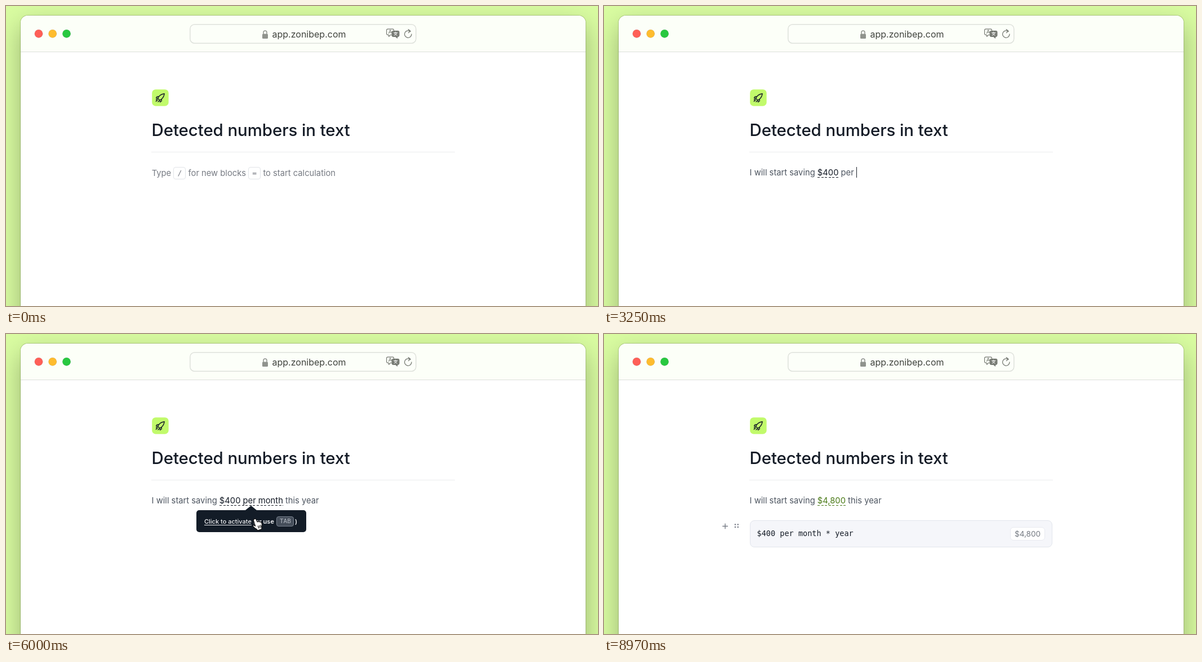
An HTML page that plays this animation: 1051x533 px, repeating every 9.44 s.

```html
<!DOCTYPE html>
<html lang="en">
<head>
<meta charset="utf-8">
<title>Numbers in text</title>
<style>
  html, body { margin: 0; width: 100%; height: 100%; overflow: hidden; background: #d9fca1; }
  body { position: relative; font: 14.74px/20px Inter, sans-serif; color: #4d5560; }
  body > * { position: absolute; white-space: pre; box-sizing: border-box; }
  [hidden] { display: none !important; }
  .window { left: 26px; top: 17px; width: 1003px; height: 560px; border-radius: 13px; background: #fff;
    box-shadow: 0 0 0 1px rgba(60,80,30,.25), 0 18px 46px rgba(0,0,0,.29); overflow: hidden; }
  .bar { height: 65px; background: #fcfff8; border-bottom: 1px solid #dcdfda; box-sizing: border-box; }
  .url { left: 472.5px; top: 40.2px; font-size: 16px; color: #40433e; }
  svg { left: 0; top: 0; }
  h1 { margin: 0; left: 258.6px; top: 199.8px; font-size: 29.44px; line-height: 40px; font-weight: 500; letter-spacing: -.08px; color: #141b26; }
  hr { margin: 0; left: 258px; top: 259px; width: 539px; height: 1.3px; border: 0; background: #ebecee; }
  #hint { left: 258.7px; top: 285.5px; display: flex; align-items: center; gap: 4.2px; color: #777b83; }
  #hint kbd { box-sizing: border-box; width: 22px; height: 22px; border: 1px solid #e1e4e8; border-radius: 4px;
    font: 13px/20px "DejaVu Sans Mono", monospace; text-align: center; }
  #line { left: 258.6px; top: 285.6px; }
  .num { color: #141b26; padding-bottom: 1px;
    background: repeating-linear-gradient(90deg, currentColor 0 4px, transparent 4px 6.6px) 0 100% / 100% 1.4px no-repeat; }
  .num.live { color: #4a7a17; }
  .caret { display: inline-block; width: 1.4px; height: 19px; margin-right: -1.4px; vertical-align: -4.4px; background: #1c222b; }
  #tip { top: 313px; width: 195px; height: 39px; margin-left: -97.5px; border-radius: 5px; background: #131c27; color: #f4f5f7;
    display: flex; align-items: center; padding-left: 14.5px; font-size: 11px; font-weight: 600; }
  #tip::before { content: ""; position: absolute; left: 87.5px; top: -8px; border: solid transparent; border-width: 0 10px 8px; border-bottom-color: #131c27; }
  #tip u { font-weight: 500; text-underline-offset: 2px; }
  #tip kbd { box-sizing: border-box; width: 31px; height: 18px; margin: 0 1.5px 0 4.5px; border: 1px solid #78818d; border-radius: 4px;
    background: #454e5a; color: #b4bac3; font: 11px/16px "DejaVu Sans Mono", monospace; text-align: center; }
  #block { left: 258.5px; top: 331.3px; width: 537.5px; height: 47.5px; border: 1px solid #e2e5ec; border-radius: 8px; background: #f5f6fa;
    font: 13.56px/45px "DejaVu Sans Mono", monospace; color: #161d27; }
  #formula { position: absolute; left: 12px; top: -.8px; }
  #result { position: absolute; right: 12px; top: 11px; box-sizing: border-box; height: 24px; padding: 0 7px; border: 1px solid #e8eaf0;
    border-radius: 6px; background: #fff; font: 13.55px/22px Inter, sans-serif; color: #757a82; }
  #result.fresh { background: #fffef0; }
</style>
</head>
<body>
<div class="window"><div class="bar"></div></div>
<h1>Detected numbers in text</h1>
<hr>
<div id="hint"><span>Type</span><kbd>/</kbd><span>for new blocks</span><kbd>=</kbd><span>to start calculation</span></div>
<div id="line"></div>
<div id="block"><span id="formula"></span><span id="result"></span></div>
<div id="tip"><u>Click to activate</u> (or use<kbd>TAB</kbd>)</div>

<svg width="1051" height="533" fill="none" stroke-linecap="round" stroke-linejoin="round">
  <rect x="326.8" y="32.700" width="401" height="33.500" rx="8" fill="#fcfff9" stroke="#dfe2dc" stroke-width="1.500"/>
  <g stroke="#000" stroke-opacity=".1" stroke-width=".8">
    <circle cx="58" cy="49.2" r="7.2" fill="#ff5f57"/>
    <circle cx="82.7" cy="49.2" r="7.2" fill="#febc2e"/>
    <circle cx="107.5" cy="49.2" r="7.2" fill="#28c840"/>
  </g>
  <rect x="455" y="49.5" width="10" height="8.5" rx="1.5" fill="#90938e"/>
  <path d="M457 50v-3a3 3 0 0 1 6 0v3" stroke="#90938e" stroke-width="1.5"/>
  <g stroke="#777b74" stroke-width="1.2" transform="translate(.6 -.2)">
    <path d="M684 51.5h-2l-3 3v-3h-1.5a2.5 2.5 0 0 1-2.5-2.5v-5.5a2.5 2.5 0 0 1 2.5-2.5h8a2.5 2.5 0 0 1 2.5 2.5"/>
    <path d="M678.8 49l2.7-6.5l2.5 6M679.700 47h3.500" stroke-width="1"/>
    <path d="M687 44.500h8a2.300 2.300 0 0 1 2.300 2.300v5.400a2.300 2.300 0 0 1-2.300 2.300h-1v2.700l-3-2.700h-4a2.300 2.300 0 0 1-2.300-2.300v-5.400a2.300 2.300 0 0 1 2.300-2.300z" fill="#777b74"/>
    <path d="M688 47.800h6.300M691 46.500v1.300M689 48q1 3 4.500 4.300M693.300 48q-1 3-4.700 4.300" stroke="#fff" stroke-width="1"/>
    <path d="M717.500 45.800a6.200 6.200 0 1 0 1.900 4.400M713.500 41.800l3.700 2.700l-3.200 3.200" stroke-width="1.300"/>
  </g>
  <rect x="259.2" y="148.200" width="29.440" height="29.440" rx="6.500" fill="#c1fa6b"/>
  <path d="M269.500 164q3-7 11.700-8.300q-1.200 8.700-8.200 11.800zM271.300 160.700l-3.300.3l-1.500 2.500l3 .5M276.300 165.700l-.2 3.300l-2.600 1.700l-.5-3.200M269.300 166.500l-3 3M267.800 165.500l-1.300 1.300M271.500 168.500l-1.500 1.700" stroke="#141b26" stroke-width="1.400"/>
  <g id="handles">
    <path d="M210.800 341.500h8.600M215.100 337.200v8.600" stroke="#777c86" stroke-width="1.400"/>
    <path d="M233 338.500h0M237.800 338.500h0M233 343h0M237.800 343h0" stroke="#777c86" stroke-width="2.700"/>
  </g>
  <g id="pointer" stroke="#111" stroke-width="1.200">
    <path id="arrow" d="M0 0v15l3.500-3.300l2.400 5.500l2.500-1.100l-2.400-5.400h4.800z" fill="#111" stroke="#fff"/>
    <path id="hand" d="M-4.800-8.300q1.700-1.200 2.800.7l2.300 4.500q1-1.400 2.600-.2q1.200-1 2.400.4q1.500-.6 2.200.8q2.200 4.700.2 8.500l.4 3.200l-7.500 2.500l-1.500-2.300q-3.500-1.600-6.600-5.200q-.5-2 1.600-1.800l2.500 1.500l-3.200-10q-.5-1.700 1.800-2.600zM1.500 4l1.300 4M4 3.200l1.200 4M6.300 2.500l1.200 3.700" fill="#fff"/>
  </g>
</svg>
<div class="url">app.zonibep.com</div>

<script>
const LOOP = 9440, STEP = 250, LAST_HOLD = 8500, LAST_CHANGE = 8970;
const LEAD = "I will start saving ", AMOUNT = "$400 per month", TAIL = " this year";
const SENTENCE = LEAD + AMOUNT + TAIL, FORMULA = AMOUNT + " * year";
const CARET = '<span class="caret"></span>';
const CLICK = 6250;

const typing = [[250, 0], [1500, 13], [2500, 23], [2750, 24], [3750, 35], [4250, 42], [4500, 44]];
const formulaTyping = [[6500, 14], [7500, 20], [7750, 21]];
const pointerX = [[5000, 478], [5250, 462], [5500, 443], [6000, 446]];
const pointerY = [[5000, 520], [5250, 410], [5500, 301], [6000, 337]];

const $ = id => document.getElementById(id);
const show = (id, on) => on ? $(id).removeAttribute("hidden") : $(id).setAttribute("hidden", "");
const within = (t, from, to) => t >= from && t < to;

function track(keys, t) {
  if (t <= keys[0][0]) return keys[0][1];
  for (let i = 1; i < keys.length; i++) {
    const [t0, a] = keys[i - 1], [t1, b] = keys[i];
    if (t <= t1) return a + (b - a) * (t - t0) / (t1 - t0);
  }
  return keys[keys.length - 1][1];
}

function value(t) {
  return t < 7500 ? AMOUNT : t < 8250 ? "$400 yes per month" : "$4,800";
}

function sentence(t) {
  if (t >= CLICK) return `${LEAD}<span class="num live">${value(t)}</span>${TAIL}`;
  const count = Math.floor(track(typing, t) + 1e-6);
  const text = SENTENCE.slice(0, count);
  const start = LEAD.length, end = start + (count < start + AMOUNT.length ? 4 : AMOUNT.length);
  const body = count < start + 2 ? text
    : `${LEAD}<span class="num">${text.slice(start, end)}</span>${text.slice(end)}`;
  return body + (within(t, 250, 5000) ? CARET : "");
}

function draw(t) {
  const active = t >= CLICK;
  show("hint", t < 500);
  $("line").innerHTML = sentence(t);

  show("tip", within(t, 2500, 3000) || within(t, 5500, CLICK));
  $("tip").style.left = (t < 2750 ? 388 : t < 3000 ? 397 : 435) + "px";

  show("block", active);
  show("handles", active);
  $("formula").innerHTML = FORMULA.slice(0, Math.floor(track(formulaTyping, t) + 1e-6))
    + (t < LAST_CHANGE ? CARET : "");
  $("result").textContent = value(t);
  $("result").className = within(t, 7500, 7750) || within(t, 8250, LAST_CHANGE) ? "fresh" : "";

  show("pointer", within(t, 5000, CLICK));
  $("pointer").setAttribute("transform", `translate(${track(pointerX, t)} ${track(pointerY, t)})`);
  show("arrow", t < 5500);
  show("hand", t >= 5500);
}

let shown = -1;
function tick() {
  const t = performance.now() % LOOP;
  const step = t >= LAST_CHANGE ? LAST_CHANGE : Math.min(LAST_HOLD, Math.floor(t / STEP) * STEP);
  if (step !== shown) draw(shown = step);
  requestAnimationFrame(tick);
}
tick();
</script>
</body>
</html>
```
